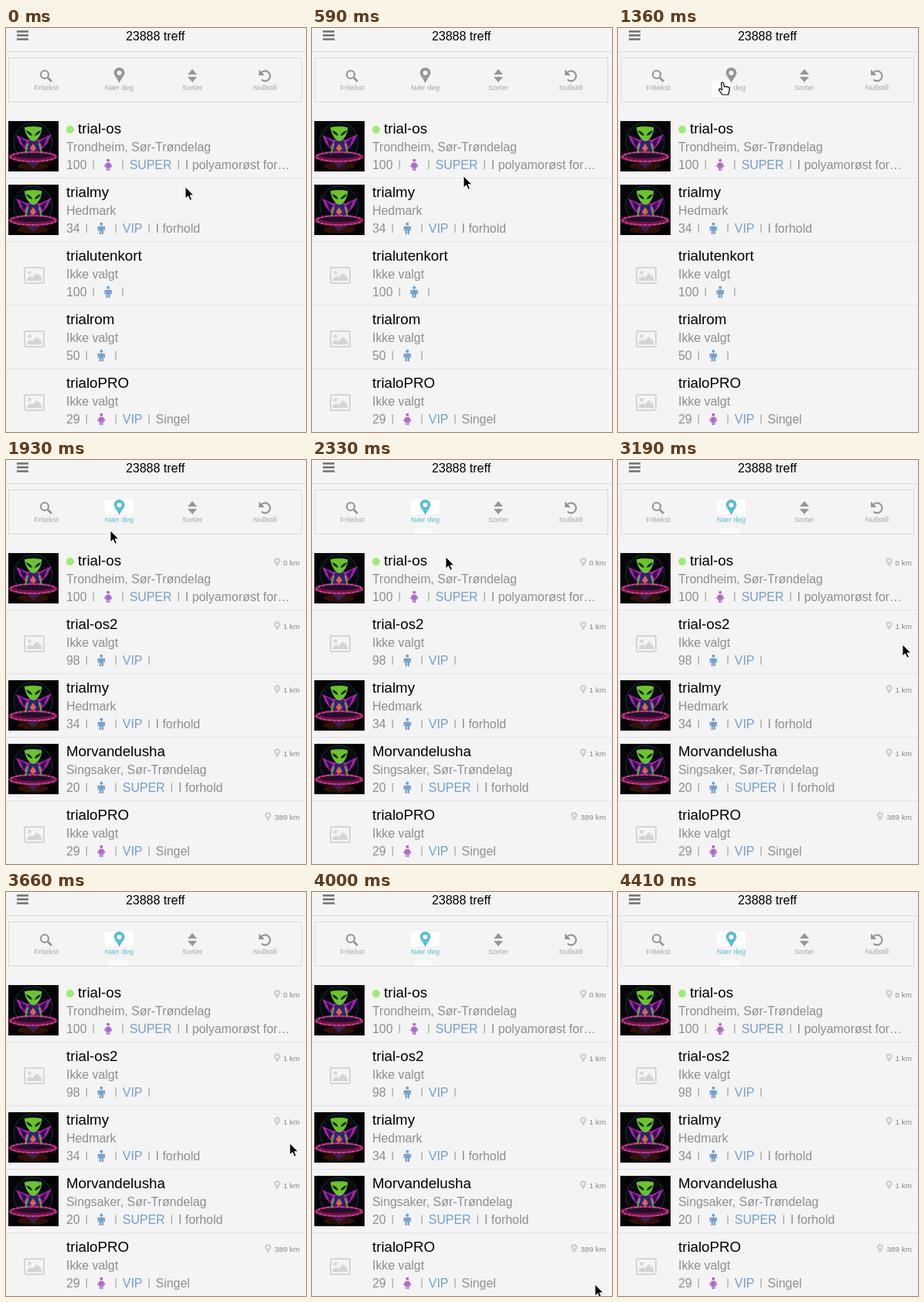
Animation, 388 px wide and 521 px high, one loop 4540 ms. Source, as an HTML page:

```html
<!DOCTYPE html>
<html lang="no">
<head>
<meta charset="utf-8">
<style>
  html, body { margin: 0; width: 100%; height: 100%; overflow: hidden; background: #f4f4f4; }
  svg { display: block; width: 388px; height: 521px; font-family: "Liberation Sans", Arial, sans-serif; }
  .name { font-size: 18.7px; fill: #000; }
  .info { font-size: 15.9px; fill: #8e8e8e; }
  .info .level { fill: #719fd3; }
  .distance { font-size: 9.9px; fill: #858585; text-anchor: end; }
  .tool { font-size: 9.6px; fill: #a6a6a6; text-anchor: middle; }
</style>
</head>
<body>
<svg viewBox="0 0 388 521">
  <defs>
    <g id="avatar">
      <rect width="65" height="65" fill="#030304"/>
      <ellipse cx="32" cy="58" rx="20" ry="5" fill="#2e1205"/>
      <ellipse cx="32" cy="27" rx="25" ry="25" fill="#04090d" stroke="#1b363e"/>
      <path d="M10 18L24 24H41L56 17 50 29 44 36H21L15 29Z" fill="#a81fae"/>
      <path d="M15 21L24 27 20 34ZM50 21L41 27 45 34Z" fill="#2a0d44"/>
      <path d="M27 25H38L42 42H23Z" fill="#32207a"/>
      <path d="M32 29L36 35 32 41 28 35Z" fill="#d8673c"/>
      <path d="M21 8Q32 6 43 8C44 15 38 26 32.5 26S21 15 21 8Z" fill="#69c52a"/>
      <path d="M23 12Q30 14 31 19Q25 18 23 12ZM42 12Q35 14 34 19Q40 18 42 12Z" fill="#13240b"/>
      <path d="M22 52L32 61 43 52Z" fill="#38204f"/>
      <ellipse cx="32" cy="46" rx="32" ry="7.5" fill="#74103f"/>
      <ellipse cx="32" cy="43.500" rx="26" ry="4.500" fill="#20102c"/>
      <ellipse cx="32" cy="46" rx="29.500" ry="6" fill="none" stroke="#c4236a" stroke-width="1.800"/>
      <ellipse class="lights" cx="32" cy="46" rx="29.500" ry="6" fill="none" stroke="#a25ad0" stroke-width="1.800" stroke-dasharray="2 4"/>
      <path d="M25 29L22 41M40 29L43 41" stroke="#58b62c" stroke-width="2"/>
    </g>
    <g id="noPhoto" fill="none" stroke="#d5d5d5" stroke-width="2">
      <rect x="21" y="25" width="25" height="20" rx="2"/>
      <circle cx="27.5" cy="31.5" r="2.3" fill="#d5d5d5" stroke="none"/>
      <path d="M24 42V39L28.5 35.5 31 38 37 32 43 38V42Z" fill="#d5d5d5" stroke="none"/>
    </g>
    <g id="man" fill="#6d9fd0">
      <circle cy="-6" r="2.1"/>
      <path d="M-4-3H4Q5-3 5-2V3H3.2V-1H2.8V8H.5V3H-.5V8H-2.8V-1H-3.2V3H-5V-2Q-5-3-4-3Z"/>
    </g>
    <g id="woman" fill="#ad67cf">
      <circle cy="-6" r="2.1"/>
      <path d="M-2.4-3H2.4L5.7 2 4.4 3 2.3 0 4 4H2.2V8H.4V4H-.4V8H-2.2V4H-4L-2.3 0-4.4 3-5.7 2Z"/>
    </g>
    <path id="pin" fill-rule="evenodd" d="M0 10C-1.5 6-7-.5-7-3A7 7 0 0 1 7-3C7-.5 1.5 6 0 10ZM0-6A3 3 0 1 0 0 0A3 3 0 1 0 0-6Z"/>
    <path id="beamLine" d="M-3-7.500Q0-7.500 0-5.500Q0-7.500 3-7.500M0-5.500V5.500M-3 7.500Q0 7.500 0 5.500Q0 7.500 3 7.500M-2 2H2"/>
  </defs>

  <rect width="388" height="521" fill="#f4f4f4"/>
  <path d="M14 4.500H29M14 9.500H29M14 14.500H29" stroke="#707070" stroke-width="2.400"/>
  <text x="193" y="16" font-size="16" text-anchor="middle">23888 treff</text>
  <path d="M0 30.500H388" stroke="#d9d9d9"/>
  <rect id="trail" x="132" y="88" width="25" height="7" fill="#fafafa"/>
  <rect x="3.500" y="38.500" width="379" height="57" fill="none" stroke="#dcdcdc"/>
  <rect id="glow" x="128" y="51" width="37" height="19" fill="#fefefe"/>

  <g fill="none" stroke="#969696" stroke-width="2.200">
    <circle cx="50" cy="60" r="5"/>
    <path d="M54 64L59 69" stroke-width="2.800"/>
    <path d="M329.500 58.500A6.500 6.500 0 1 1 330.500 66.500"/>
  </g>
  <path d="M327 53.500V61H334.500ZM235 60L241 53 247 60ZM235 63H247L241 70Z" fill="#969696"/>
  <use id="nearPin" href="#pin" x="146.500" y="61"/>
  <text class="tool" x="52" y="80">Fritekst</text>
  <text class="tool" id="nearText" x="146.500" y="80">Nær deg</text>
  <text class="tool" x="241" y="80">Sorter</text>
  <text class="tool" x="335" y="80">Nullstill</text>
  <rect id="press" x="121" y="68" width="23" height="21" fill="#fdfdfd"/>

  <path d="M0 193.500H388M0 275.500H388M0 357.500H388M0 439.500H388" stroke="#e4e4e4"/>
  <g id="allList"></g>
  <g id="nearList"></g>

  <g id="cursor">
    <path id="arrow" d="M0 0V15L3.500 11.700 6 17.300 8.400 16.200 6 10.800H10.800Z" fill="#000" stroke="#fff" stroke-width=".9"/>
    <path id="hand" d="M-1.500 1Q0-1 1.500 1L2.500 6Q4 4.500 5 6Q6.500 5 7.300 6.500Q9 6 9 8V11L7.500 16H0L-4.500 10Q-4.500 7.500-2 9L-.5 10Z" fill="#fff" stroke="#000" stroke-width="1.200" stroke-linejoin="round"/>
    <g id="beam" fill="none">
      <use href="#beamLine" x=".5" stroke="#fff" stroke-width="2.400"/>
      <use href="#beamLine" x=".5" stroke="#000" stroke-width="1.100"/>
    </g>
  </g>
</svg>
<script>
const LOOP = 4540, ROW = 82, FIRST_ROW = 120;
const PIN_ON = 1500, LIST_ON = 1760;
const $ = id => document.getElementById(id);

const online = { name: 'trial-os', place: 'Trondheim, Sør-Trøndelag', age: 100, sex: 'woman', level: 'SUPER', status: 'I polyamorøst for…', photo: true, online: true };
const vip = { name: 'trialmy', place: 'Hedmark', age: 34, sex: 'man', level: 'VIP', status: 'I forhold', photo: true };
const single = { name: 'trialoPRO', place: 'Ikke valgt', age: 29, sex: 'woman', level: 'VIP', status: 'Singel' };

const everyone = [
  online,
  vip,
  { name: 'trialutenkort', place: 'Ikke valgt', age: 100, sex: 'man' },
  { name: 'trialrom', place: 'Ikke valgt', age: 50, sex: 'man' },
  single
];
const nearby = [
  { ...online, km: 0 },
  { name: 'trial-os2', place: 'Ikke valgt', age: 98, sex: 'man', level: 'VIP', status: '', km: 1 },
  { ...vip, km: 1 },
  { name: 'Morvandelusha', place: 'Singsaker, Sør-Trøndelag', age: 20, sex: 'man', level: 'SUPER', status: 'I forhold', photo: true, km: 1 },
  { ...single, km: 389 }
];

const bar = x => `<rect x="${x}" y="50.500" width="1.300" height="11.500" fill="#a6a6a6"/>`;

function distance(km) {
  const pinX = 380 - 21.7 - (String(km).length - 1) * 5.9 - 7.5;
  return `<use href="#pin" transform="translate(${pinX} 12) scale(.6)" fill="#cfcfcf"/>
    <text class="distance" x="380" y="16">${km} km</text>`;
}

function row(person, index) {
  const ageEnd = 78 + String(person.age).length * 8.9;
  let extra = '';
  if (person.level) {
    const levelEnd = ageEnd + 55 + (person.level === 'VIP' ? 25.8 : 55.1);
    extra = `<text class="info"><tspan class="level" x="${ageEnd + 55}" y="62">${person.level}</tspan>
      <tspan x="${levelEnd + 17}" y="62">${person.status}</tspan></text>` + bar(levelEnd + 7.8);
  }
  return `<g transform="translate(0 ${FIRST_ROW + index * ROW})">
    <use href="#${person.photo ? 'avatar' : 'noPhoto'}" x="3"/>
    ${person.online ? '<circle cx="83" cy="11" r="5" fill="#9ded70"/>' : ''}
    <text class="name" x="${person.online ? 93 : 78}" y="16">${person.name}</text>
    <text class="info" x="78" y="39">${person.place}</text>
    <text class="info" x="78" y="62">${person.age}</text>
    ${bar(ageEnd + 7.8)}${bar(ageEnd + 45.6)}
    <use href="#${person.sex}" transform="translate(${ageEnd + 27.5} 56.500) scale(.95)"/>
    ${extra}${person.km === undefined ? '' : distance(person.km)}
  </g>`;
}

$('allList').innerHTML = everyone.map(row).join('');
$('nearList').innerHTML = nearby.map(row).join('');

// Pointer path: time, x, y
const path = [
  [0, 232, 205], [400, 232, 205], [530, 221, 201], [590, 196, 191],
  [720, 174, 150], [880, 154, 98], [1060, 143, 66], [1200, 137, 68],
  [1360, 135, 70], [1640, 136, 72], [1760, 136, 78], [1930, 135, 91],
  [2100, 139, 96], [2270, 148, 115], [2360, 185, 130], [2600, 360, 134],
  [2680, 367, 132], [2740, 367, 133], [2850, 368, 161], [3430, 368, 292],
  [3660, 367, 323], [4000, 366, 506], [4060, 366, 530], [LOOP, 366, 530]
];

function pointerAt(t) {
  const i = path.findIndex(key => key[0] > t);
  const [t0, x0, y0] = path[i - 1], [t1, x1, y1] = path[i];
  const k = (t - t0) / (t1 - t0);
  return [x0 + (x1 - x0) * k, y0 + (y1 - y0) * k];
}

function pointerKind(t, x, y) {
  if (y < 88) return 'hand';
  const fromLabel = (y - 132 + ROW / 2) % ROW - ROW / 2;
  return t > LIST_ON && x > 357 && Math.abs(fromLabel) < 7 ? 'beam' : 'arrow';
}

const show = (id, on) => { $(id).style.display = on ? '' : 'none'; };
const lights = document.querySelector('.lights');

function draw(t) {
  const [x, y] = pointerAt(t);
  const kind = pointerKind(t, x, y);
  const near = t >= LIST_ON;
  $('cursor').setAttribute('transform', `translate(${Math.round(x)} ${Math.round(y)})`);
  for (const id of ['arrow', 'hand', 'beam']) show(id, id === kind);
  show('allList', !near);
  show('nearList', near);
  show('press', t >= 1180 && t < LIST_ON);
  show('glow', t >= PIN_ON);
  show('trail', t >= 2270);
  $('nearPin').setAttribute('fill', t >= PIN_ON ? '#57bfd8' : '#969696');
  $('nearText').style.fill = near ? '#57bfd8' : '';
  lights.setAttribute('stroke-dashoffset', -2 * (Math.floor(t / 110) % 3));
}

function tick(now) {
  draw(now % LOOP);
  requestAnimationFrame(tick);
}
draw(0);
requestAnimationFrame(tick);
</script>
</body>
</html>
```
